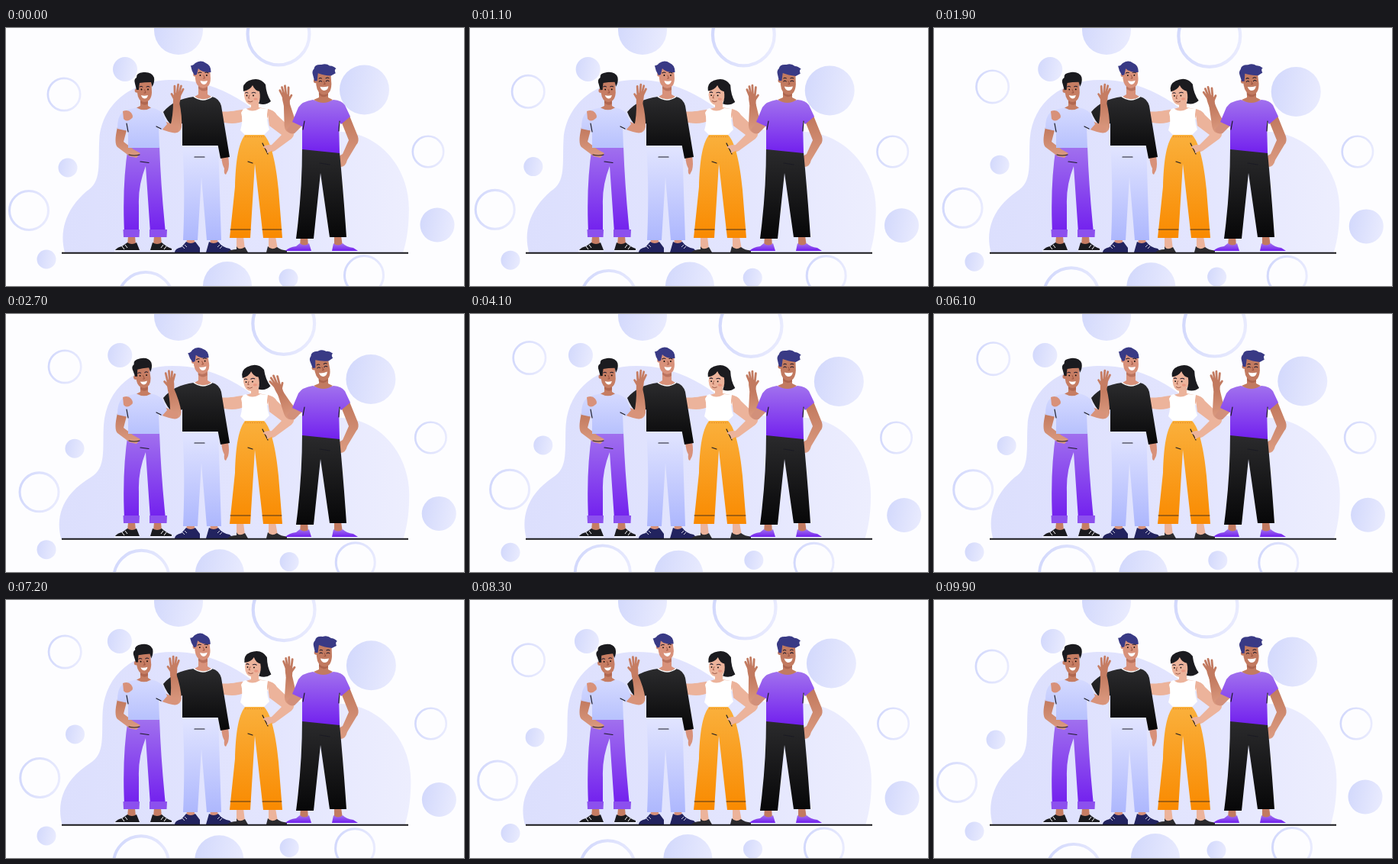
Write an HTML page that moves like this. It is 600 by 338 pixels and loops after 10000 ms.

```html
<!DOCTYPE html>
<html lang="en">
<head>
<meta charset="utf-8">
<title>Four friends waving</title>
<style>
  html, body { margin: 0; width: 100%; height: 100%; overflow: hidden; background: #fdfdff; }
  svg { display: block; width: 100vw; height: 100vh; }
  .line { fill: none; stroke: #1b1b24; stroke-width: 1.2; stroke-linecap: round; }
  .brow { fill: none; stroke: #1e1a2c; stroke-width: 1; stroke-linecap: round; }
  .nose { fill: none; stroke: #8f4937; stroke-width: .8; stroke-linecap: round; }
  .fingers { fill: none; stroke: currentColor; stroke-width: 2.8; stroke-linecap: round; }
  .s1 { color: #c67d63; fill: #c67d63; }
  .s2 { color: #d8917a; fill: #d8917a; }
  .s3 { color: #ecb39b; fill: #ecb39b; }
  .s4 { color: #c27a60; fill: #c27a60; }
  .shade { fill: #8e4735; opacity: .4; }
  .white { fill: #fff; }
  .black { fill: #1b1b1f; }
  .navy { fill: #393a85; }
</style>
</head>
<body>
<svg viewBox="0 0 600 338" preserveAspectRatio="none">
  <defs>
    <linearGradient id="bubble" x1="0" y1=".4" x2="1" y2=".6"><stop stop-color="#d3d9fc"/><stop offset="1" stop-color="#e9ebfe"/></linearGradient>
    <linearGradient id="blobFill"><stop stop-color="#dcdffd"/><stop offset=".6" stop-color="#e3e5fe"/><stop offset="1" stop-color="#edeefe"/></linearGradient>
    <linearGradient id="shirt" x2="0" y2="1"><stop stop-color="#d5daff"/><stop offset="1" stop-color="#b7c1fd"/></linearGradient>
    <linearGradient id="violet" x2="0" y2="1"><stop stop-color="#a171ee"/><stop offset="1" stop-color="#7220ee"/></linearGradient>
    <linearGradient id="pale" x2="0" y2="1"><stop stop-color="#e3e6ff"/><stop offset="1" stop-color="#adb7fd"/></linearGradient>
    <linearGradient id="dark" x2="0" y2="1"><stop stop-color="#2b2b2d"/><stop offset="1" stop-color="#070708"/></linearGradient>
    <linearGradient id="orange" x2="0" y2="1"><stop stop-color="#fab03c"/><stop offset="1" stop-color="#f98a00"/></linearGradient>
    <linearGradient id="arm" x2="0" y2="1"><stop stop-color="#c1785d"/><stop offset="1" stop-color="#dc9c82"/></linearGradient>
    <g id="hand">
      <path d="M-4 2L-4.500-8Q-5-13 0-13L5-12Q6-8 4 2Z" fill="currentColor"/>
      <path class="fingers" d="M-3-5L-7-11M-3-12L-4-21.500M0-12L.5-24M2.500-12L4.500-22.500M4-10L7.500-18.500"/>
    </g>
  </defs>

  <g id="bubbles"></g>
  <path id="blob" fill="url(#blobFill)"/>

  <!-- woman's far arm -->
  <path class="s3" d="M316 106C304 107 294 111 278 109V122C292 126 303 126 314 121Z"/>

  <!-- black sweater -->
  <g>
    <path class="s2" d="M237 275H247V286H236ZM268 275H277L278 286H267Z"/>
    <path fill="#22235f" d="M236 280Q242 284 248 280L254 288V294H221Q221 289 230 287ZM266 280Q272 284 278 280Q284 288 293 289L298 294H262Z"/>
    <path stroke="#fff" stroke-width=".8" d="M231 286l3 3M234 284l3 3M280 284l-3 3M283 286l-3 3"/>
    <path fill="url(#pale)" d="M231 151H278Q280 215 282 278H263L256 195L251 278H232Q235 210 231 151Z"/>
    <path class="line" d="M247 169H260"/>
    <path class="s2" d="M282 168L291 168Q293 178 291 186L288 192Q285 191 286 184Q283 179 282 168Z"/>
    <path fill="url(#dark)" d="M246 90Q258 95 270 90Q279 92 282 102L293 169L281 171L275 140L278 154H231V125L219 130Q210 121 206 110Q220 93 246 90Z"/>
    <path class="s2" d="M247 90L252 87V74H264V87L269 90Q258 97 247 90Z"/>
    <path d="M246 90Q258 98 270 90" fill="none" stroke="#fff" stroke-width="1.5"/>
    <g id="head2">
      <path class="shade" d="M252 75Q258 82 264 76V81Q258 85 252 79Z"/>
      <circle class="s2" cx="248" cy="61" r="2.800"/>
      <path class="s2" d="M248 50H267L268 66Q268 78.500 258 78.500Q249 78 248 66Z"/>
      <path class="navy" d="M247 62Q243 56 242 49Q245 50 248 46Q255 41 262 46Q269 49 268.500 58Q258 59 252 53L250 61Z"/>
      <path class="brow" d="M252 59Q254 57.500 256 58.500M261 58.500Q263 57.500 265 59"/>
      <circle cx="254.500" cy="62" r=".9"/><circle cx="263" cy="62" r=".9"/>
      <path class="nose" d="M259 62L260.500 66H258.500"/>
      <path class="white" d="M254.500 69Q259 70.500 264 69Q263 74 259 74Q255.500 73.500 254.500 69Z"/>
    </g>
  </g>

  <!-- pale blue shirt -->
  <g>
    <path class="s1" d="M160 273H169L170 284H159ZM194 273H203L204 284H193Z"/>
    <path class="black" d="M159 281Q165 285 171 281L175 291H143Q146 287 152 286ZM192 281Q198 285 204 281Q209 286 217 289V291H189Z"/>
    <path stroke="#fff" stroke-width="1" d="M142 292H175M189 292H218M152 286l3 4M156 284l3 4M206 284l-3 4M210 286l-3 4"/>
    <path fill="url(#violet)" d="M160 155H201Q203 210 209 268H189L183 181Q173 206 174 232V268H155Q152 205 160 155Z"/>
    <path fill="#8c50ee" d="M153.500 264H175L174.500 274H154ZM188 264H211L210.500 274H188Z"/>
    <path class="line" d="M176 175L187 176.500"/>
    <path fill="url(#arm)" d="M146 130L158 134L154 149L167 159L176 164L171 170L162 168L146 156Q141 151 146 130Z"/>
    <path class="line" d="M161 166Q168 168 175 166"/>
    <g id="wave1">
      <path fill="url(#arm)" d="M219 97H227Q231 116 230 130Q228 138 221 137L215 130Q219 115 219 97Z"/>
      <use href="#hand" class="s1" transform="translate(223 98) rotate(5)"/>
    </g>
    <path fill="#d8937a" d="M203 120L222 128Q229 132 224 137Q219 139 202 132Z"/>
    <path fill="url(#shirt)" d="M172 104H189Q200 106 205 112L211 126L204 134L200 130L201 157H160V135L146 132Q146 116 152 111Q160 106 172 104Z"/>
    <path class="line" d="M158 125L160 136M197 129L203 132"/>
    <path class="s2" d="M153 109Q160 106 164 111Q168 117 164 119Q158 124 154 119Z"/>
    <path class="s1" d="M171 104.500L176 102V91H186V102L190 104.500Q181 110 171 104.500Z"/>
    <g id="head1">
      <path class="shade" d="M176 93Q181 100 186 94V99Q181 103 176 98Z"/>
      <circle class="s1" cx="171.500" cy="82" r="2.800"/>
      <path class="s1" d="M172 69H190.500L191 85Q190 97 181 97Q173 96 172 85Z"/>
      <path class="black" d="M171 81L169 73Q167 67 171 65Q170 59 180 58Q191 57 194 65Q195 71 191.500 77L190 71Q181 71 175 72Q174 77 174 81Z"/>
      <path class="brow" d="M175 77Q177 75.500 179 77M184 77Q186 75.500 188 77"/>
      <circle cx="177.500" cy="80.500" r=".9"/><circle cx="186" cy="80.500" r=".9"/>
      <path class="nose" d="M181.500 80.500L183 85H181"/>
      <path class="white" d="M177 88Q181 89.500 186 88Q185 92.500 181.500 92.500Q178 92 177 88Z"/>
    </g>
  </g>

  <!-- woman -->
  <g>
    <path class="s3" d="M302 273H311L313 290H302ZM344 273H353L356 290H344Z"/>
    <path fill="#2c2b2f" d="M302 286Q305 292 313 287L317 294H290Q294 290 302 290ZM343 286Q348 292 355 287Q360 291 368 291.500V294H341Z"/>
    <path class="s3" d="M342 106Q351 107 355 114L375 133Q380 139 374 145L352 161L342 165Q339 160 347 154L361 140L345 128Z"/>
    <path fill="url(#orange)" d="M313 140H338C348 150 354 180 357 212L362 275H337L326 178L320 275H293L300 208C301 175 304 152 313 140Z"/>
    <path d="M313 142.500H338" stroke="#e88f25" stroke-width="1.200" stroke-dasharray="2 1"/>
    <path class="line" d="M317 175L323 177M336 151L343 165"/>
    <path class="line" style="stroke-width:.8" d="M294 264H320M336 264H361"/>
    <path class="s3" d="M336 156Q342 151 350 154L348 161L342 164Q343 158 336 156Z"/>
    <path class="s3" d="M311 107L321 104V96H331V104L346 107L340 125H310Z"/>
    <path class="white" d="M311 106L314 105Q322 112 333 105L343 106Q340 120 345 133L338 140H313L307 134Q311 121 308 111Z"/>
    <g id="head3">
      <path class="s3" d="M313 77Q322 69 332 76L334 88Q332 101 322 101Q313 100 312 88Z"/>
      <path class="black" d="M311 83Q309 73 318 69Q332 63 340 74Q341 87 347 96Q340 102 331 99Q334 91 332 83Q326 82 323 75Q320 81 311 83Z"/>
      <path class="brow" d="M313.500 85Q315 83.500 317 85M322 85Q325 83.500 327 85"/>
      <circle cx="315.500" cy="88.500" r=".9"/><circle cx="324" cy="88.500" r=".9"/>
      <ellipse cx="327" cy="93" rx="2.600" ry="1.600" fill="#e88470" opacity=".6"/>
      <path class="nose" d="M319 88L317.500 92H319M317 96Q320 98 323 96"/>
    </g>
  </g>

  <!-- violet T-shirt -->
  <g>
    <path class="s4" d="M386 272H395L396 286H385ZM430 272H439L441 286H430Z"/>
    <path fill="url(#violet)" d="M385 282Q391 287 397 282L400 292H366Q371 287 380 286ZM429 282Q435 287 441 282Q446 287 455 288L461 292H427Z"/>
    <path fill="url(#arm)" d="M439 122L450 115L461 142Q463 149 459 153L447 173Q445 182 438 182L436 168L441 165L449 147Z"/>
    <path fill="url(#dark)" d="M388 157L437 163Q442 215 446 274H424L412 190L403 276H380Q388 215 388 157Z"/>
    <path class="line" d="M411 177L424 179"/>
    <g id="wave4">
      <path fill="url(#arm)" d="M367 99H375Q378 115 383 130Q380 138 372 137Q365 136 365 127Z"/>
      <use href="#hand" class="s4" transform="translate(371 99) rotate(1) scale(-1 1)"/>
    </g>
    <path fill="#d2907a" d="M378 121L389 127L378 138Q370 140 368 133Z"/>
    <path fill="url(#violet)" d="M402 94Q415 100 429 94Q440 95 444 101L451 116L439 126L436 122L437 164L388 159V129L375 123L383 104Q388 96 402 94Z"/>
    <path class="line" d="M389 133L391 122M437 122L436 135"/>
    <path class="s4" d="M403 94L410 91V80H422V91L428 94Q416 102 403 94Z"/>
    <g id="head4">
      <path class="shade" d="M410 83Q416 91 422 84V88Q416 93 410 87Z"/>
      <circle class="s4" cx="406.500" cy="69" r="2.800"/>
      <path class="s4" d="M407 57H426.500L427 74Q426 87.500 417 87.500Q408 86.500 407 74Z"/>
      <path class="navy" d="M405 69L403 60Q402 56 405 53Q406 47 415 48Q421 46 426 50Q430 50 434 54Q431 55 433 60L427 63Q417 62 410 59L408.500 69Z"/>
      <path class="brow" d="M411 66Q412.500 64.500 414.500 66M420 66Q422 64.500 424 66M411 70Q412.500 68 414.500 70M420 70Q422 68 424 70"/>
      <path class="nose" d="M417 69.500L419 73.500H417"/>
      <path class="white" d="M412 76.500Q417 78 423 76.500Q422 82 417 82Q413 81.500 412 76.500Z"/>
    </g>
  </g>

  <path d="M73 294.800H527" stroke="#17171b" stroke-width="2"/>
</svg>
<script>
const LOOP = 10000, STEP = 100;
const $ = id => document.getElementById(id);
const bubbles = [];

// A bubble sways around its home along one drift vector
function addBubble(r, home, drift, ring = false) {
  const el = document.createElementNS("http://www.w3.org/2000/svg", "circle");
  const width = ring ? 1 + r * 0.075 : 0;
  el.setAttribute("r", r - width / 2);
  el.setAttribute("fill", ring ? "none" : "url(#bubble)");
  if (ring) {
    el.setAttribute("stroke", "url(#bubble)");
    el.setAttribute("stroke-width", width);
  }
  $("bubbles").append(el);
  bubbles.push({ el, home, drift });
}
const disc = (r, home, drift) => addBubble(r, home, drift);
const ring = (r, home, drift) => addBubble(r, home, drift, true);

disc(32, [226, 3], [0, 0]);
disc(32.5, [477, 85], [-7.5, -4]);
disc(16, [150, 54], [6, 0]);
disc(12.5, [89, 177], [-8, 6]);
disc(12.5, [53, 308], [0, -5]);
disc(32, [281, 340], [9, -2]);
disc(12.5, [371, 325], [-1, 3]);
disc(22.5, [567, 261], [-2, -3]);
ring(42.5, [363, 12], [-6, -4]);
ring(22.5, [77, 71], [-1, 16]);
ring(27, [42, 234], [-12, 5]);
ring(38, [178, 347], [5, 9]);
ring(27, [459, 325], [10, -1]);
ring(21.5, [556, 162], [-3, 0]);

const swing = (t, period, peak = 0) => Math.cos(2 * Math.PI * (t - peak) / period);
const turn = (id, angle, x, y) => $(id).setAttribute("transform", `rotate(${angle} ${x} ${y})`);

function drawBlob(t) {
  const l = 72 + 3 * swing(t, 5000, 600);
  const m = 125 - 3.3 * swing(t, 5000, 500);
  const r = 528.5 + 3.5 * swing(t, 5000, 1400);
  $("blob").setAttribute("d", `M${l + 3} 295C${l - 6} 262 ${l + 8} 234 ${m - 17} 214
    C${m + 4} 202 ${m - 2} 176 ${m} 145C${m + 4} 97 168 68 218 68
    C262 68 296 84 332 112C366 138 405 135 440 136
    C492 139 ${r} 185 ${r} 237C${r} 260 ${r - 3} 280 ${r - 8} 295Z`);
}

function draw(t) {
  const sway = swing(t, LOOP);
  for (const { el, home, drift } of bubbles) {
    el.setAttribute("cx", home[0] + drift[0] * sway);
    el.setAttribute("cy", home[1] + drift[1] * sway);
  }
  drawBlob(t);
  const first = swing(t, 1000) - 1, last = swing(t, 1000, 170) - 1;
  turn("wave1", 9.4 * first, 222, 131);
  turn("wave4", 11 * last, 376, 131);
  turn("head1", 4.5 * first, 181, 99);
  turn("head2", 4 * (swing(t, 1000, 50) - 1), 258, 83);
  turn("head3", 4 * swing(t, 1000, 250), 325, 103);
  turn("head4", 4.5 * last, 416, 90);
}

const start = performance.now();
function tick() {
  const t = (performance.now() - start) % LOOP;
  draw(Math.floor(t / STEP) * STEP);
  requestAnimationFrame(tick);
}
tick();
</script>
</body>
</html>
```
